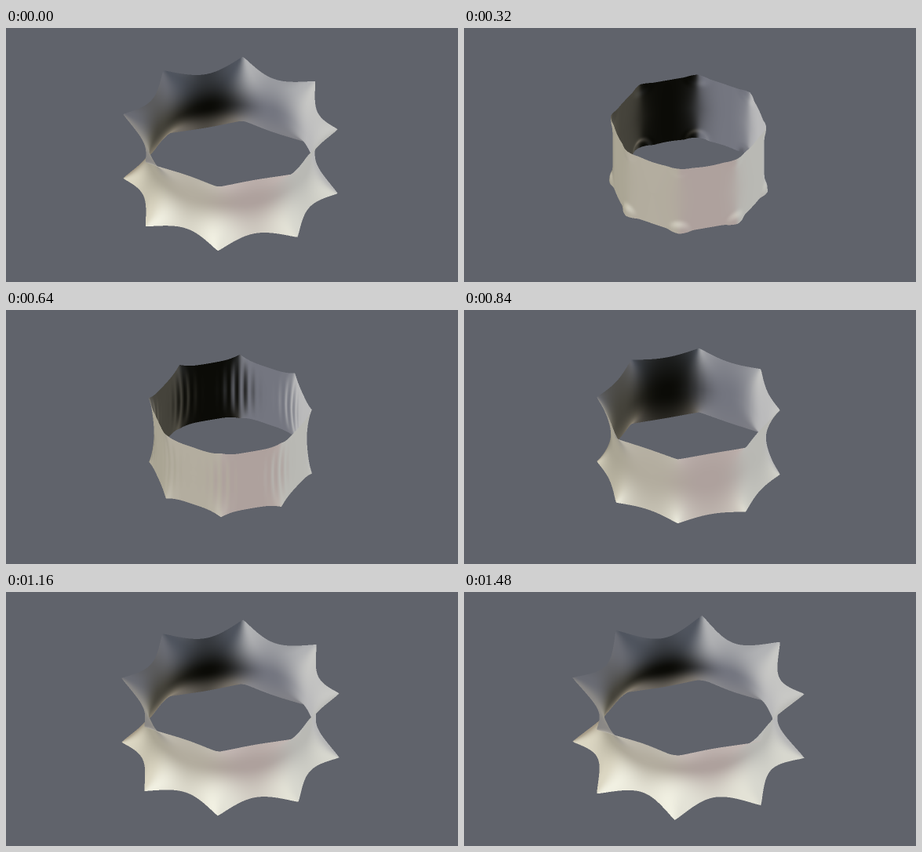
An HTML page with a canvas that plays this animation: 576 px wide and 324 px high, repeating every 1.52 s.

```html
<!DOCTYPE html>
<html lang="en">
<head>
<meta charset="utf-8">
<title>Elastic band</title>
<style>
html, body { margin: 0; width: 100%; height: 100%; overflow: hidden; background: #60636b; }
canvas { display: block; width: 576px; height: 324px; }
</style>
</head>
<body>
<canvas id="stage" width="576" height="324"></canvas>
<script>
const LOOP = 1520, STEP = 40;
const W = 576, H = 324, SS = 2, BW = W * SS, BH = H * SS;
const PINS = 8, SEG = 32, COLS = PINS * SEG, ROWS = 48;
const CX = 286, CY = 160.5, TILT = 0.607, LIFT = 0.795, HALF = 51.5;
const TURN = 6.66 * Math.PI / 180, SECTOR = 2 * Math.PI / PINS;

const view = document.getElementById('stage').getContext('2d');
const buffer = document.createElement('canvas');
buffer.width = BW;
buffer.height = BH;
const bctx = buffer.getContext('2d');
const image = bctx.createImageData(BW, BH);
const pixels = new Uint32Array(image.data.buffer);
const depth = new Float32Array(BW * BH);

const mix = (a, b, f) => a + (b - a) * f;
const smooth = x => { x = Math.min(1, Math.max(0, x)); return x * x * (3 - 2 * x); };
const bell = (t, mid, width) => Math.exp(-(((t - mid) / width) ** 2));
const pack = (r, g, b) => (255 << 24 | b << 16 | g << 8 | r) >>> 0;
const palette = list => list.split(' ').map(h => [0, 2, 4].map(i => parseInt(h.substr(i, 2), 16)));

// Outward-normal colours, one per panel around the ring, for level, upward and downward faces
const LEVEL = palette('b9b9b4 aea19d b3ad9f aaa594 45433b 0b0b07 747680 bbbbbc');
const UP = palette('d8d8cf e4e3d7 f2f1e3 dcd7c3 a59a86 7a746c 86868b b8b8b8');
const DOWN = palette('bcbcb8 c2b6b2 bfbaae 8a8886 6a6c74 50555f b2b3b5 c9c9c6');

// Pin radius over time: [ms, px]
const KEYS = [[-40, 143], [0, 138], [160, 118], [320, 98], [460, 95], [640, 104.7],
  [840, 117.7], [1160, 140], [1480, 149.2], [1800, 140]];

function pinRadius(t) {
  let i = 1;
  while (i < KEYS.length - 3 && t > KEYS[i + 1][0]) i++;
  const slope = k => (KEYS[k + 1][1] - KEYS[k - 1][1]) / (KEYS[k + 1][0] - KEYS[k - 1][0]);
  const [t0, a] = KEYS[i], [t1, b] = KEYS[i + 1];
  const d = t1 - t0, f = (t - t0) / d, g = 1 - f;
  return a * g * g * (1 + 2 * f) + b * f * f * (1 + 2 * g)
    + d * f * g * (slope(i) * g - slope(i + 1) * f);
}

// u squared on the rim, each harmonic fading towards the waist
function scallop(u, s, fade) {
  let sum = 0;
  for (let n = 1; n <= 20; n++) {
    const k = Math.exp(-fade * n * (1 - Math.abs(s))) / (n * n);
    sum += (n % 2 ? -k : k) * Math.cos(n * Math.PI * u);
  }
  return 1 / 3 + sum * 4 / (Math.PI * Math.PI);
}

const COUNT = COLS * (ROWS + 1);
const [PX, PY, PZ, SX, SY, SD, CR, CG, CB] = Array.from({ length: 9 }, () => new Float32Array(COUNT));

function shape(t) {
  const R = pinRadius(t);
  const slack = bell(t, 380, 110), wrinkle = bell(t, 620, 110);
  const tension = 0.12 * Math.max(0, R - 103) ** 1.3;
  const drop = 0.7 * tension + 3 * slack + 6 * wrinkle;
  const mid = 0.924 * R - tension + 4.5 * slack;
  const reach = R - mid, mean = mid + reach / 3;
  const x = R - 99, waist = 96 + 0.08 * x + 0.0027 * x * x;
  const fade = mix(0.8, 3.6, smooth((R - 98) / 35)) + wrinkle;
  for (let j = 0; j <= ROWS; j++) {
    const s = Math.sin((j / ROWS - 0.5) * Math.PI);
    for (let i = 0; i < SEG; i++) {
      const u = 2 * i / SEG - 1, c = scallop(u, s, fade);
      const dx = (1 - Math.abs(u)) * 39, dz = (1 - Math.abs(s)) * HALF;
      const near = Math.exp(-(((dx * dx + dz * dz) / 196) ** 2));
      const fold = Math.cos(dx * 2 * Math.PI / 11) * Math.exp(-((dx / 20) ** 2)) * (1 - s * s);
      const r = waist + (mean - waist) * s * s + reach * (c - 1 / 3)
        + 5 * slack * near * (s < 0 ? 1 : 0.5) + 0.8 * wrinkle * fold;
      const z = s * (HALF - drop * (1 - Math.max(0, c) ** (1 + wrinkle)));
      for (let p = 0; p < PINS; p++) {
        const a = TURN + (p + i / SEG) * SECTOR, k = j * COLS + p * SEG + i;
        PX[k] = r * Math.cos(a);
        PY[k] = r * Math.sin(a);
        PZ[k] = z;
        SX[k] = (CX + PX[k]) * SS;
        SY[k] = (CY + PY[k] * TILT - z * LIFT) * SS;
        SD[k] = PY[k] * LIFT + z * TILT;
      }
    }
  }
}

function shade() {
  for (let j = 0; j <= ROWS; j++) {
    const lo = Math.max(0, j - 1) * COLS, hi = Math.min(ROWS, j + 1) * COLS;
    for (let i = 0; i < COLS; i++) {
      const k = j * COLS + i;
      const l = j * COLS + (i + COLS - 1) % COLS, r = j * COLS + (i + 1) % COLS;
      const ax = PX[r] - PX[l], ay = PY[r] - PY[l], az = PZ[r] - PZ[l];
      const bx = PX[hi + i] - PX[lo + i], by = PY[hi + i] - PY[lo + i], bz = PZ[hi + i] - PZ[lo + i];
      const nx = ay * bz - az * by, ny = az * bx - ax * bz, nz = ax * by - ay * bx;
      const up = nz / (Math.hypot(nx, ny, nz) || 1);
      const turn = (Math.atan2(ny, nx) - TURN) / SECTOR - 0.5 + PINS;
      const p = Math.floor(turn), f = smooth(turn - p);
      const a = p % PINS, b = (p + 1) % PINS;
      const tone = up > 0 ? UP : DOWN, w = smooth(Math.abs(up) / 0.75);
      const channel = n => mix(mix(LEVEL[a][n], LEVEL[b][n], f), mix(tone[a][n], tone[b][n], f), w);
      CR[k] = channel(0);
      CG[k] = channel(1);
      CB[k] = channel(2);
    }
  }
}

function triangle(a, b, c) {
  const ax = SX[a], ay = SY[a], bx = SX[b], by = SY[b], cx = SX[c], cy = SY[c];
  const area = (bx - ax) * (cy - ay) - (by - ay) * (cx - ax);
  if (Math.abs(area) < 1e-6) return;
  const x0 = Math.floor(Math.min(ax, bx, cx)), x1 = Math.ceil(Math.max(ax, bx, cx));
  const y0 = Math.floor(Math.min(ay, by, cy)), y1 = Math.ceil(Math.max(ay, by, cy));
  for (let y = y0; y < y1; y++) {
    for (let x = x0; x < x1; x++) {
      const qx = x + 0.5, qy = y + 0.5;
      const u = ((bx - qx) * (cy - qy) - (by - qy) * (cx - qx)) / area;
      const v = ((cx - qx) * (ay - qy) - (cy - qy) * (ax - qx)) / area;
      const w = 1 - u - v;
      if (u < 0 || v < 0 || w < 0) continue;
      const d = u * SD[a] + v * SD[b] + w * SD[c], k = y * BW + x;
      if (d <= depth[k]) continue;
      depth[k] = d;
      pixels[k] = pack(u * CR[a] + v * CR[b] + w * CR[c],
        u * CG[a] + v * CG[b] + w * CG[c], u * CB[a] + v * CB[b] + w * CB[c]);
    }
  }
}

function render(t) {
  shape(t);
  shade();
  pixels.fill(pack(96, 99, 107));
  depth.fill(-1e9);
  for (let j = 0; j < ROWS; j++) {
    for (let i = 0; i < COLS; i++) {
      const n = (i + 1) % COLS, a = j * COLS + i, b = j * COLS + n;
      triangle(a, b, a + COLS);
      triangle(b, b + COLS, a + COLS);
    }
  }
  bctx.putImageData(image, 0, 0);
  view.drawImage(buffer, 0, 0, W, H);
}

let shown = -1;
function tick() {
  const step = Math.floor(performance.now() % LOOP / STEP);
  if (step !== shown) render((shown = step) * STEP);
  requestAnimationFrame(tick);
}
tick();
</script>
</body>
</html>
```
